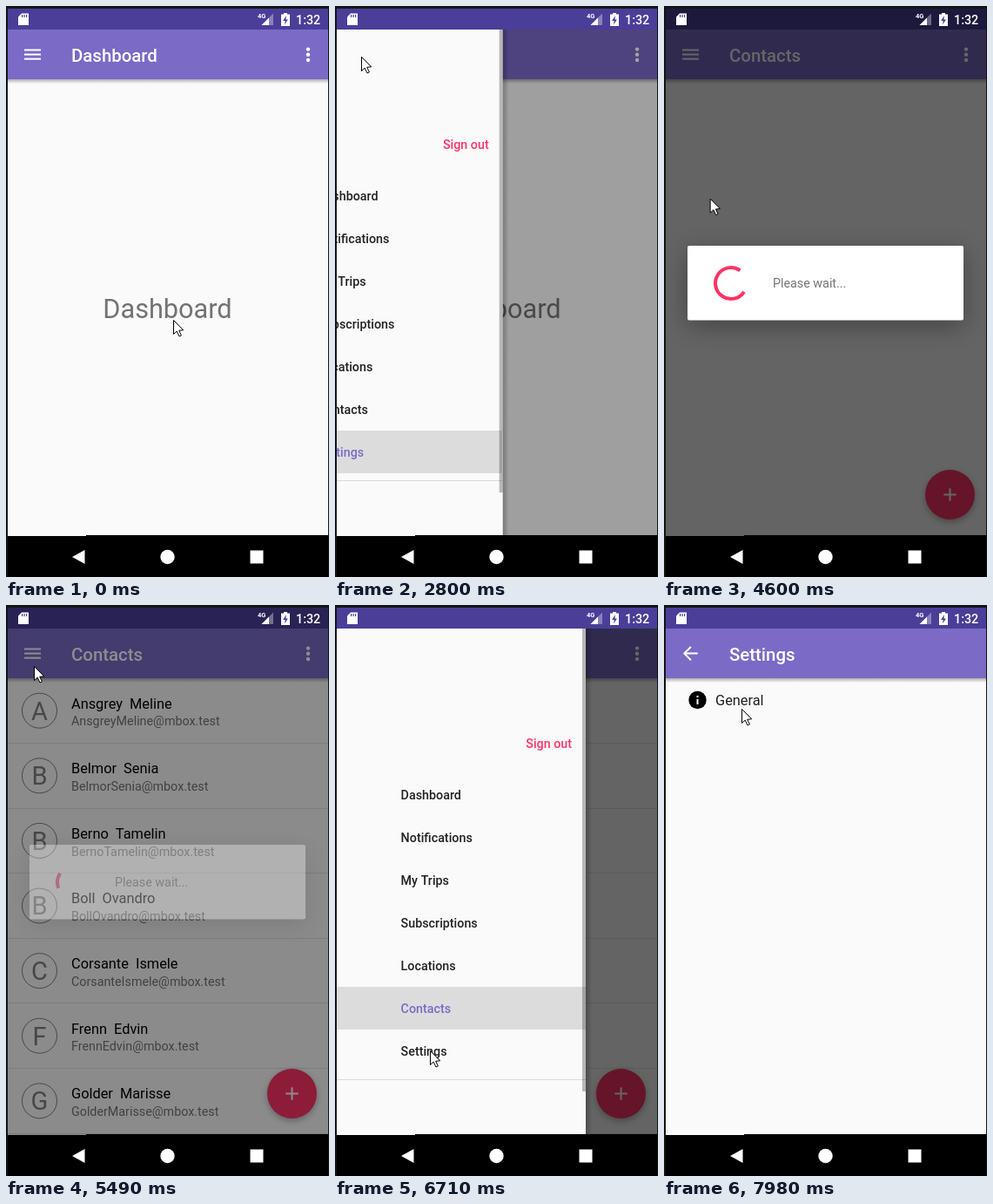
These frames come from a looping animation (371x655 px, 8 s). An HTML page with a canvas:

```html
<!DOCTYPE html>
<html lang="en">
<head>
<meta charset="utf-8">
<title>Navigation drawer</title>
<style>
  html, body { margin: 0; width: 100%; height: 100%; overflow: hidden; background: #141414; }
  canvas { display: block; }
</style>
</head>
<body>
<canvas id="stage" width="371" height="655"></canvas>
<script>
const stage = document.getElementById('stage').getContext('2d');
const layer = new OffscreenCanvas(371, 655).getContext('2d');
let c = stage;

const LOOP = 8000, PURPLE = '#7b6ac6', PINK = '#ff3366', PAPER = '#fafafa', INK = '#212121', GREY = '#757575';
const BAR = '#4a3e98', DRAWER_W = 286, DIM = .6;

const menu = ['Dashboard', 'Notifications', 'My Trips', 'Subscriptions', 'Locations', 'Contacts', 'Settings'];
const people = ['Ansgrey Meline', 'Belmor Senia', 'Berno Tamelin', 'Boll Ovandro', 'Corsante Ismele',
  'Frenn Edvin', 'Golder Marisse'];

// Pointer moves: start, end, destination
const moves = [[840, 990, 84, 270], [1130, 1920, 61, 129], [1950, 2230, 30, 78], [2420, 2480, 30, 58],
  [2850, 3460, 92, 448], [3700, 4000, 85, 457], [4180, 5300, 32, 70], [5500, 5700, 39, 77],
  [5950, 6600, 109, 511], [7020, 7710, 96, 124], [7930, 7980, 89, 119]];

const ramp = (t, from, span) => Math.max(0, Math.min(1, (t - from) / span));
const easeOut = (u, power) => 1 - (1 - u) ** power;

// cubic-bezier(.4, 0, .2, 1), solved by bisection
function ease(x) {
  let s = .5;
  for (let step = .25; step > 1e-4; step /= 2) {
    s += 1.2 * s * (1 - s) ** 2 + .6 * s * s * (1 - s) + s ** 3 < x ? step : -step;
  }
  return 3 * s * s * (1 - s) + s ** 3;
}

function pointer(t) {
  let x = 192, y = 360;
  for (const [start, end, toX, toY] of moves) {
    const u = easeOut(ramp(t, start, end - start), 2);
    x += (toX - x) * u;
    y += (toY - y) * u;
  }
  return [x, y];
}

function drawerOpen(t) {
  const settle = from => easeOut(ramp(t, from, 512), 5);
  return settle(2700) - settle(4100) + settle(5811) - settle(6740);
}

// The dialog shows twice; the dimming behind it lags a little
function dialogState(t) {
  const [from, to] = t < 6000 ? [4110, 5400] : [6890, 7200];
  return {
    alpha: ramp(t, from, 80) - ramp(t, to, 135),
    dim: DIM * (ramp(t, from + 25, 130) - ramp(t, to + 40, 200)),
    age: t - (t < 6000 ? 4090 : 6820)
  };
}

function rect(x, y, w, h, fill) {
  c.fillStyle = fill;
  c.fillRect(x, y, w, h);
}

function disc(x, y, r, fill) {
  c.fillStyle = fill;
  c.beginPath();
  c.arc(x, y, r, 0, 7);
  c.fill();
}

function arc(x, y, r, from, to, colour, width) {
  c.strokeStyle = colour;
  c.lineWidth = width;
  c.beginPath();
  c.arc(x, y, r, from, to);
  c.stroke();
}

function poly(points, fill) {
  c.fillStyle = fill;
  c.beginPath();
  points.forEach(([x, y]) => c.lineTo(x, y));
  c.closePath();
  c.fill();
}

function text(s, x, y, size, fill, weight = 400, align = 'left') {
  c.font = `${weight} ${size}px Roboto, sans-serif`;
  c.textAlign = align;
  c.fillStyle = fill;
  c.fillText(s, x, y);
}

function shadow(blur, dy, alpha) {
  c.shadowBlur = blur;
  c.shadowOffsetY = dy;
  c.shadowColor = `rgba(0,0,0,${alpha})`;
}

function fade(x, y, w, h, dx, dy, alpha) {
  const g = c.createLinearGradient(x, y, x + dx, y + dy);
  g.addColorStop(0, `rgba(0,0,0,${alpha})`);
  g.addColorStop(1, 'rgba(0,0,0,0)');
  rect(x, y, w, h, g);
}

function statusIcons() {
  poly([[18, 8.5], [26, 8.5], [26, 22], [14, 22], [14, 12.5]], '#fff');
  for (let i = 0; i < 3; i++) rect(18 + i * 2.5, 10, 1.2, 3, BAR);
  text('4G', 289, 14, 7.5, '#fff', 700);
  poly([[307, 8.5], [307, 22], [293.5, 22]], 'rgba(255,255,255,.35)');
  poly([[302, 13.5], [302, 22], [293.5, 22]], '#fff');
  rect(316, 9.5, 10, 13.5, '#fff');
  rect(319, 8, 4, 2, '#fff');
  poly([[321.8, 11], [318.2, 17], [320.6, 17], [320.2, 21.2], [323.9, 15.4], [321.5, 15.4]], BAR);
  text('1:32', 333, 20.5, 14.3, '#fff', 500);
}

function navBar() {
  rect(2, 608, 368, 47, '#000');
  rect(92, 607, 278, 1, '#000');
  poly([[76, 632], [90.5, 624], [90.5, 640]], '#fff');
  disc(185.5, 632, 8.2, '#fff');
  rect(280.5, 624.5, 15, 15, '#fff');
}

function toolbar(title, open, back) {
  fade(2, 84, 368, 5, 0, 5, .3);
  rect(2, 27, 368, 57, PURPLE);
  c.save();
  c.translate(30.5, 55.6);
  if (back) {
    c.strokeStyle = '#fff';
    c.lineWidth = 2;
    c.beginPath();
    c.moveTo(8.2, 0); c.lineTo(-7, 0);
    c.moveTo(.4, -7.6); c.lineTo(-7.2, 0); c.lineTo(.4, 7.6);
    c.stroke();
  } else {
    c.rotate(-Math.PI * open);
    for (let i = -1; i < 2; i++) rect(-9.5, i * 5.1 - 1, 19, 2, '#fff');
  }
  c.restore();
  text(title, 75, 63.5, 20.4, '#fff', 500);
  for (let i = -1; i < 2 && !back; i++) disc(347, 55.8 + i * 6.2, 2.2, '#fff');
}

function contactList() {
  people.forEach((name, i) => {
    const y = 84 + i * 74.6;
    arc(38.5, y + 37.2, 20, 0, 7, '#808080', 1);
    text(name[0], 38.5, y + 47.5, 29, '#808080', 400, 'center');
    text(name.replace(' ', '  '), 75, y + 34.5, 16.35, '#000');
    text(name.replace(' ', '') + '@mbox.test', 75, y + 54.3, 14.3, GREY);
    rect(2, Math.round(y + 74), 368, 1, '#e1e1e1');
  });
}

function addButton() {
  c.save();
  shadow(7, 3, .28);
  disc(328.5, 560.5, 28.5, PINK);
  c.restore();
  rect(321.3, 559.5, 14.4, 2, '#fff');
  rect(327.5, 553.3, 2, 14.4, '#fff');
}

function mainPage(t, open) {
  const contacts = t >= 4300;
  rect(2, 27, 368, 581, PAPER);
  if (t >= 5360) contactList();
  if (contacts) addButton();
  else text('Dashboard', 185.5, 358, 30.66, '#737373', 400, 'center');
  toolbar(contacts ? 'Contacts' : 'Dashboard', open, false);
}

function settingsPage() {
  rect(2, 27, 368, 581, PAPER);
  disc(38.5, 109, 10.2, '#000');
  rect(37.5, 108, 2, 6, '#fff');
  rect(37.5, 104, 2, 2, '#fff');
  text('General', 59, 115, 16.35, INK);
  toolbar('Settings', 0, true);
}

function drawer(t, open) {
  if (open < .002) return;
  const right = 2 + DRAWER_W * open, left = right - DRAWER_W;
  const chosen = t < 3950 || t > 6720 ? 6 : 5;
  fade(right, 27, 7, 581, 7, 0, .25);
  rect(left, 27, DRAWER_W, 581, PAPER);
  text('Sign out', right - 16, 164, 14.3, PINK, 500, 'right');
  menu.forEach((label, i) => {
    const y = 193 + i * 49, on = i === chosen;
    if (on) rect(left, y, DRAWER_W, 49, '#dcdcdc');
    text(label, left + 73.6, y + 29.5, 14.3, on ? PURPLE : INK, 500);
  });
  rect(left, 544, DRAWER_W, 1, '#dadada');
  rect(right - 4, 27, 4, 531, 'rgba(0,0,0,.27)');
}

function spinner(age) {
  const p = age % 1260 / 1260, deg = Math.PI / 180;
  const base = -90 + 90 * p + .17 * age;
  const tail = base + 270 * ease(ramp(p, .5, .5));
  const head = base + 270 * ease(ramp(p, 0, .5)) + 8;
  arc(77, 318, 18, tail * deg, head * deg, PINK, 4);
}

// Painted on its own layer so that it fades as a whole
function dialog({ alpha, age }) {
  if (!alpha) return;
  c = layer;
  c.clearRect(0, 0, 371, 655);
  c.save();
  shadow(28, 7, .32);
  c.fillStyle = '#fff';
  c.beginPath();
  c.roundRect(27, 275, 317, 85.5, 2);
  c.fill();
  c.restore();
  spinner(age);
  text('Please wait...', 125, 323, 14.3, GREY);
  c = stage;
  c.globalAlpha = alpha;
  c.drawImage(layer.canvas, 0, 0);
  c.globalAlpha = 1;
}

function cursor(x, y) {
  c.save();
  c.translate(x + .5, y + .5);
  poly([[0, 0], [0, 16], [3.7, 12.6], [6.5, 18.5], [8.9, 17.4], [6.2, 11.8], [11.2, 11.3]], '#fff');
  c.strokeStyle = '#000';
  c.lineWidth = 1;
  c.stroke();
  c.restore();
}

function draw(t) {
  const open = drawerOpen(t), wait = dialogState(t), enter = ramp(t, 7200, 200);
  // The scrim trails the drawer
  const scrim = DIM * Math.max(drawerOpen(t - 14), drawerOpen(t - 60));

  rect(0, 0, 371, 655, '#141414');
  c.save();
  c.beginPath();
  c.rect(2, 3, 368, 605);
  c.clip();
  mainPage(t, open);
  rect(2, 27, 368, 581, `rgba(0,0,0,${scrim})`);
  drawer(t, open);
  if (enter) {
    c.save();
    c.globalAlpha = enter;
    c.translate(0, 40 * (1 - enter) ** 2);
    settingsPage();
    c.restore();
  }
  rect(2, 3, 368, 24, BAR);
  rect(2, 3, 368, 605, `rgba(0,0,0,${wait.dim})`);
  dialog(wait);
  c.restore();
  statusIcons();
  navBar();
  cursor(...pointer(t));
}

function frame() {
  draw(performance.now() % LOOP);
  requestAnimationFrame(frame);
}
frame();
</script>
</body>
</html>
```
